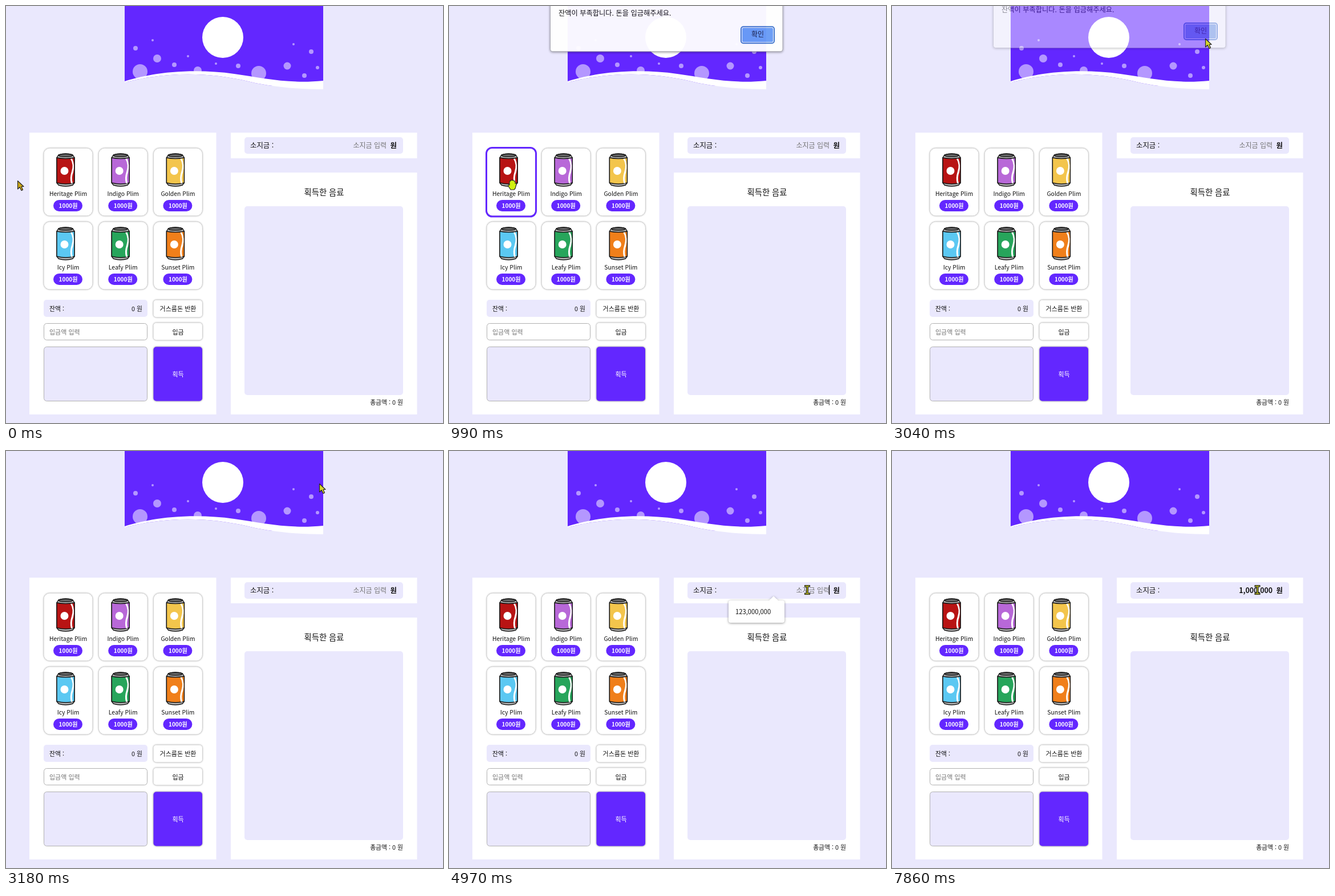
These frames come from a looping animation (766x731 px, 8 s). An HTML page:

```html
<!DOCTYPE html>
<html lang="ko">
<head>
<meta charset="utf-8">
<style>
html, body { margin: 0; width: 100%; height: 100%; overflow: hidden; background: #eae8fd; }
svg { display: block; }
text { font: 500 11px "Noto Sans CJK KR", "Noto Sans CJK", sans-serif; fill: #111; white-space: pre; }
.mid { text-anchor: middle; }
.end { text-anchor: end; }
.bold { font-weight: 700; }
.hint { fill: #757575; font-weight: 400; }
.soft { filter: drop-shadow(0 0 1.6px rgba(0,0,0,.5)); }
.pop { filter: drop-shadow(0 1px 2px rgba(0,0,0,.4)); }
</style>
</head>
<body>
<svg id="stage" width="766" height="731" viewBox="0 0 766 731"></svg>
<script>
const VIOLET = '#6327ff', PALE = '#eae8fd';
const rect = (x, y, w, h, r, fill, more = '') =>
  `<rect x="${x}" y="${y}" width="${w}" height="${h}" rx="${r}" fill="${fill}" ${more}/>`;
const text = (x, y, size, str, cls = '', more = '') =>
  `<text x="${x}" y="${y}" class="${cls}" style="font-size:${size}px;${more}">${str}</text>`;
const circle = (x, y, r, fill) => `<circle cx="${x}" cy="${y}" r="${r}" fill="${fill}"/>`;
const outline = 'stroke="#b0b0b0"';

const bubbles = [[235,115,13], [227,74,4], [265,92,7], [257,60,2], [295,103,4], [319,88,2], [336,113,7],
  [368,101,2], [407,105,4], [443,118,13], [493,105,6.5], [523,122,4], [535,80,4], [546,108,3], [504,67,2]];

const banner = `<path d="M208 0H556V140H400L208 133Z" fill="${VIOLET}"/>
  ${bubbles.map(b => circle(...b, '#b497ff')).join('')}
  <path d="M208 134C290 113 360 118 420 131C450 139 500 146 556 146V160H208Z" fill="${PALE}"/>
  <path d="M208 132C255 116 330 109 400 119C450 126 495 137 556 131V146C500 146 450 139 420 131C360 118 290 113 208 134Z" fill="#fff"/>
  ${circle(380, 55, 36, '#fff')}`;

const can = (x, y, color) => `<g transform="translate(${x} ${y})" stroke="#151515" stroke-width="1.4">
  <path d="M4 3Q16.500 -1 29 3L32 8V52L29 56Q16.500 60 4 56L1 52V8Z" fill="#b9b9b9"/>
  <ellipse cx="16.500" cy="3.800" rx="12" ry="2.600" fill="#666"/>
  <path d="M1 8Q16.500 11 32 8V52Q16.500 56 1 52Z" fill="${color}"/>
  <path d="M25 10Q31 20 27 32Q23 44 26 53L29 52.500Q26 43 30 33Q33 20 28 9.500Z" fill="#fff" stroke="none"/>
  <circle cx="14.500" cy="31" r="7" fill="#fff" stroke="none"/></g>`;

const drinks = [['Heritage Plim', '#b81414'], ['Indigo Plim', '#b868d8'], ['Golden Plim', '#f3c54c'],
  ['Icy Plim', '#5bc8f2'], ['Leafy Plim', '#27a55b'], ['Sunset Plim', '#f07f1a']];
const card = ([name, color], i) => {
  const x = 66 + i % 3 * 96.2, y = 249 + (i > 2 ? 129 : 0);
  return rect(x + .5, y + .5, 85, 118, 10, '#fff', 'class="soft"')
    + (i ? '' : rect(65.5, 248.5, 87, 120.5, 10, 'none', `id="picked" stroke="${VIOLET}" stroke-width="3"`))
    + can(x + 22, y + 9, color) + text(x + 43, y + 84, 10.4, name, 'mid')
    + rect(x + 17, y + 91, 51, 20, 10, VIOLET)
    + text(x + 43, y + 105, 10, '1000원', 'mid bold', 'fill:#fff');
};

const machine = rect(41, 222, 327.5, 494, 0, '#fff') + drinks.map(card).join('')
  + rect(66, 515, 182, 30, 5, PALE) + text(76, 535, 10.8, '잔액 :') + text(239, 535, 10.8, '0 원', 'end')
  + rect(66.5, 556.5, 181, 29, 5, '#fff', outline) + text(76, 576, 11, '입금액 입력', 'hint')
  + rect(66.5, 597.5, 181, 95, 5, PALE, outline)
  + rect(258.5, 515.5, 85.5, 30, 5, '#fff', 'class="soft"') + text(301.5, 535, 11, '거스름돈 반환', 'mid')
  + rect(258.5, 555.5, 85.5, 30, 5, '#fff', 'class="soft"') + text(301.5, 576, 11, '입금', 'mid')
  + rect(258.5, 597.5, 85.5, 95, 5, VIOLET, 'class="soft"') + text(301.5, 650, 11, '획득', 'mid', 'fill:#fff');

const wallet = rect(394, 222, 326.5, 45, 0, '#fff') + rect(418, 230, 278, 29, 5, PALE)
  + text(428, 249, 12.4, '소지금 :') + text(685, 249, 12.4, '원', 'end bold')
  + text(667, 248.5, 12, '소지금 입력', 'end hint').replace('<text', '<text id="hint"')
  + text(667, 249, 12.3, '', 'end bold').replace('<text', '<text id="money"')
  + rect(666, 235, 1.2, 17, 0, '#000', 'id="caret"')
  + rect(394, 292, 326.5, 424, 0, '#fff') + text(557.5, 332, 14.3, '획득한 음료', 'mid')
  + rect(418, 351, 278, 331, 5, PALE) + text(696, 699, 10.8, '총금액 : 0 원', 'end');

const history = `<g id="history"><path class="pop" fill="#fff"
  d="M494 262H561L569 254.500L577 262H584Q588 262 588 266V297Q588 301 584 301H494Q490 301 490 297V266Q490 262 494 262Z"/>
  ${text(502, 286, 11.2, '123,000,000', '', 'font-family:"Open Sans",sans-serif;font-weight:400;fill:#333')}</g>`;

const dialog = `<g id="dialog">${rect(177.5, -40, 407.5, 122.5, 4, '#fff', 'class="pop" stroke="#a5a5ae"')}
  ${text(192, 20, 12.25, '잔액이 부족합니다. 돈을 입금해주세요.', '', 'font-weight:300')}
  ${rect(512, 39, 58, 29, 4, '#fff', 'stroke="#3d73cc" stroke-width="2"')}
  ${rect(514, 41, 54, 25, 2, '#699df6', 'id="ok"')}
  ${text(541, 57, 12, '확인', 'mid', 'font-weight:400;fill:#1b2348')}</g>`;

const cursor = `<g id="cursor" stroke="#222" stroke-width="1.1" stroke-linejoin="round">
  <path id="arrow" d="M.5 .5V15L4 11.500L7 17.500L9.500 16.200L7 10.500H11Z"/>
  <path id="hand" d="M-3 3Q-3 0 -1 1V0Q1 -2 2 0Q4 -2 5 1Q7 0 7 3V5Q10 4 9 7L7 14L5 16H-1L-5 10Q-6 7 -3 8Z"/>
  <path id="beam" d="M-4.500 -8H4.500V-5.500H1.500V5.500H4.500V8H-4.500V5.500H-1.500V-5.500H-4.500Z"/></g>`;

const stage = document.getElementById('stage');
stage.innerHTML = banner + machine + wallet + history + dialog + cursor;
const el = Object.fromEntries([...stage.querySelectorAll('[id]')].map(e => [e.id, e]));
const show = (e, on) => e.setAttribute('visibility', on ? 'visible' : 'hidden');

// Last value whose start time has passed.
const at = (t, keys) => keys.reduce((v, k) => t >= k[0] ? k[1] : v, keys[0][1]);

// start, end, steps, from, control, to
const moves = [
  [60, 390, 6, [20, 306], [65, 290], [109, 306]],
  [1520, 2310, 13, [109, 306], [250, 370], [549, 57]],
  [3440, 4240, 13, [549, 57], [560, 485], [606, 262]],
];
function pointer(t) {
  if (t >= 4310) return [at(t, [[4310, 616], [4970, 628], [5040, 633], [5360, 637], [5430, 639], [5560, 640.5]]), 243.5];
  const [a, b, n, p, c, q] = moves.filter(m => t >= m[0]).pop() || moves[0];
  const k = t < a ? 0 : Math.min(n, Math.floor((t - a) * (n - 1) / (b - a) + 1.01)) / n;
  const s = k * k * (3 - 2 * k);
  return [0, 1].map(i => p[i] * (1 - s) ** 2 + 2 * c[i] * s * (1 - s) + q[i] * s * s);
}

const typed = [[0, ''], [6480, '1'], [6610, '10'], [6680, '100'], [6810, '1000'], [6880, '1,000'], [6940, '1,0000'],
  [7010, '10,000'], [7070, '10,0000'], [7140, '100,000'], [7270, '100,0000'], [7340, '1,000,000']];

function draw(t) {
  const [x, y] = pointer(t);
  const beam = t >= 4310, hand = !beam && x > 66 && x < 345 && y > 249;
  show(el.beam, beam);
  show(el.hand, hand);
  show(el.arrow, !beam && !hand);
  el.cursor.setAttribute('transform', `translate(${x} ${y})`);
  el.cursor.setAttribute('fill', at(t, [[0, '#c9a516'], [390, '#d0f010'], [2840, '#d6d52c'], [4310, '#a9a81c']]));

  show(el.picked, t >= 720 && t < 2980);
  const [shift, alpha] = at(t, [[0, [0, 0]], [860, [-26, .3]], [920, [-9, .7]], [990, [-2.7, .96]], [1050, [0, 1]],
    [2840, [-1, .9]], [2910, [-4, .7]], [2980, [-9, .45]], [3050, [-16, .22]], [3110, [-24, .07]], [3180, [0, 0]]]);
  el.dialog.setAttribute('transform', `translate(0 ${shift})`);
  el.dialog.setAttribute('opacity', alpha);
  el.ok.setAttribute('fill', x > 511 && y < 69 ? '#6695e2' : '#699df6');

  el.history.setAttribute('opacity', at(t, [[0, 0], [4510, .6], [4640, 1], [6480, .8], [6550, .5], [6610, .25], [6680, .1], [6750, 0]]));
  const money = at(t, typed);
  el.money.textContent = money;
  show(el.hint, !money);
  show(el.caret, at(t, [[0, 0], [4510, 1], [5040, 0], [5560, 1], [6080, 0], [6480, 1], [7860, 0]]));
}

const begin = performance.now();
function tick() {
  draw((performance.now() - begin) % 8000);
  requestAnimationFrame(tick);
}
tick();
</script>
</body>
</html>
```
